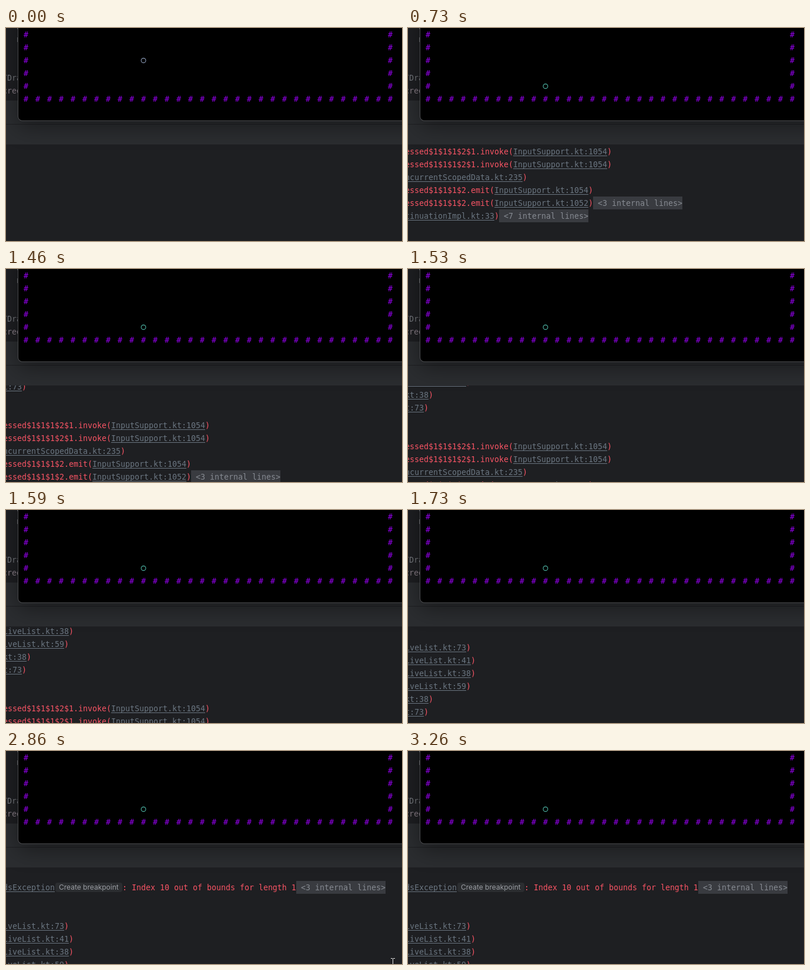
Animation of 674x364 px, one loop 3.33 s. Source, as an HTML page with a canvas:

```html
<!DOCTYPE html>
<html lang="en">
<head>
<meta charset="utf-8">
<title>Console</title>
<style>
html, body { margin: 0; width: 100%; height: 100%; overflow: hidden; background: #1e1f22; }
canvas { display: block; }
</style>
</head>
<body>
<canvas id="stage" width="674" height="364"></canvas>
<script>
const ctx = document.getElementById('stage').getContext('2d');
const LOOP = 3330, CHAR = 8, ROW = 22, LEFT = -5;
const MONO = '13.29px "DejaVu Sans Mono", monospace';
const RED = '#f75464', LINK = '#6a7580', FOLD = '#393b40', FOLD_TEXT = '#868a91';

// Each row is a list of [kind, text] runs.
const frame = (call, link, lines) =>
  [['err', call], ['link', link], ['err', ')'], ...(lines ? [fold(lines)] : [])];
const fold = n => ['fold', ` <${n} internal lines>`];
const invoke = frame('essed$1$1$1$2$1.invoke(', 'InputSupport.kt:1054');
const emit = 'essed$1$1$1$2.emit(';
const trace = [
  [['link', 'dsException'], ['hint', 'Create breakpoint'],
   ['err', ': Index 10 out of bounds for length 1'], fold(3)],
  [], [],
  frame('', 'iveList.kt:73'),
  frame('', 'LiveList.kt:41'),
  frame('', 'LiveList.kt:38'),
  frame('', 'iveList.kt:59'),
  frame('', 'kt:38'),
  frame('', 't:73'),
  [], [],
  invoke,
  invoke,
  frame('', 'ncurrentScopedData.kt:235'),
  frame(emit, 'InputSupport.kt:1054'),
  frame(emit, 'InputSupport.kt:1052', 3),
  frame('', 'tinuationImpl.kt:33', 7)
];

function rect(x, y, w, h, color) {
  ctx.fillStyle = color;
  ctx.fillRect(x, y, w, h);
}

function text(str, x, y, color, font = MONO) {
  ctx.font = font;
  ctx.fillStyle = color;
  ctx.fillText(str, x, y);
}

function panel(x, y, w, h, r, color) {
  ctx.beginPath();
  ctx.roundRect(x, y, w, h, r);
  ctx.fillStyle = color;
  ctx.fill();
}

// Draws one run and returns its width.
function drawRun(kind, str, x, mid) {
  if (kind === 'hint') {
    panel(x + 1, mid - 8, 114, 16, 4, '#2b2d30');
    text(str, x + 7, mid + 4, '#9a9da3', '12px Inter, sans-serif');
    return 115;
  }
  const w = str.length * CHAR;
  if (kind === 'fold') rect(x, mid - 11, w, ROW, FOLD);
  text(str, x, mid + 5, { err: RED, link: LINK, fold: FOLD_TEXT }[kind]);
  if (kind === 'link') rect(x, mid + 7, w, 1, LINK);
  return w;
}

function drawTrace(top) {
  ctx.save();
  ctx.beginPath();
  ctx.rect(0, 199, 674, 165);
  ctx.clip();
  trace.forEach((runs, i) => {
    let x = LEFT;
    for (const [kind, str] of runs) x += drawRun(kind, str, x, top + i * ROW);
  });
  ctx.restore();
}

function drawEditor() {
  rect(0, 0, 674, 364, '#1e1f22');
  rect(0, 124, 674, 40, '#2b2d30');
  rect(0, 165, 674, 34, '#2b2d30');
  text('r', 17, 2, '#85878c');
  text('r', 17, 24, '#85878c');
  text('/Dra', -6, 90, '#75787d');
  text('cree', -6, 112, '#8a7f88');
}

function drawTerminal() {
  ctx.save();
  ctx.shadowColor = 'rgba(0,0,0,.4)';
  ctx.shadowBlur = 36;
  ctx.shadowOffsetY = 10;
  panel(20, -40, 720, 199, 8, '#4b4c4f');
  ctx.restore();
  panel(21, -39, 718, 197, 7, '#000');
  const wall = (x, y) => text('#', x, y, '#9000e6');
  for (let y = 16; y < 120; y += ROW) {
    wall(30, y);
    wall(650, y);
  }
  for (let x = 30; x <= 650; x += 20) wall(x, 126);
}

function drawBall(t) {
  const step = (t >= 130) + (t >= 330);
  ctx.beginPath();
  ctx.arc(234, 55.5 + step * ROW, 3.9, 0, Math.PI * 2);
  ctx.lineWidth = 1.1;
  ctx.strokeStyle = ['#8c9cb8', '#6fa6b0', '#4fb8a8'][step];
  ctx.stroke();
}

function drawCursor() {
  for (const x of [655, 659]) rect(x, 354, 3, 1, '#e6e6e6');
  rect(658, 355, 1, 9, '#e6e6e6');
}

function scrollTop(t) {
  if (t < 800) return -31;
  if (t < 1460) return 8;
  return Math.min(233, 25 + 36 * Math.floor((t - 1458) / 66));
}

function draw(now) {
  const t = now % LOOP;
  drawEditor();
  drawTerminal();
  drawBall(t);
  if (t >= 730) drawTrace(scrollTop(t));
  if (t >= 2860 && t < 2920) drawCursor();
}

const start = performance.now();
function tick() {
  draw(performance.now() - start);
  requestAnimationFrame(tick);
}
tick();
</script>
</body>
</html>
```
